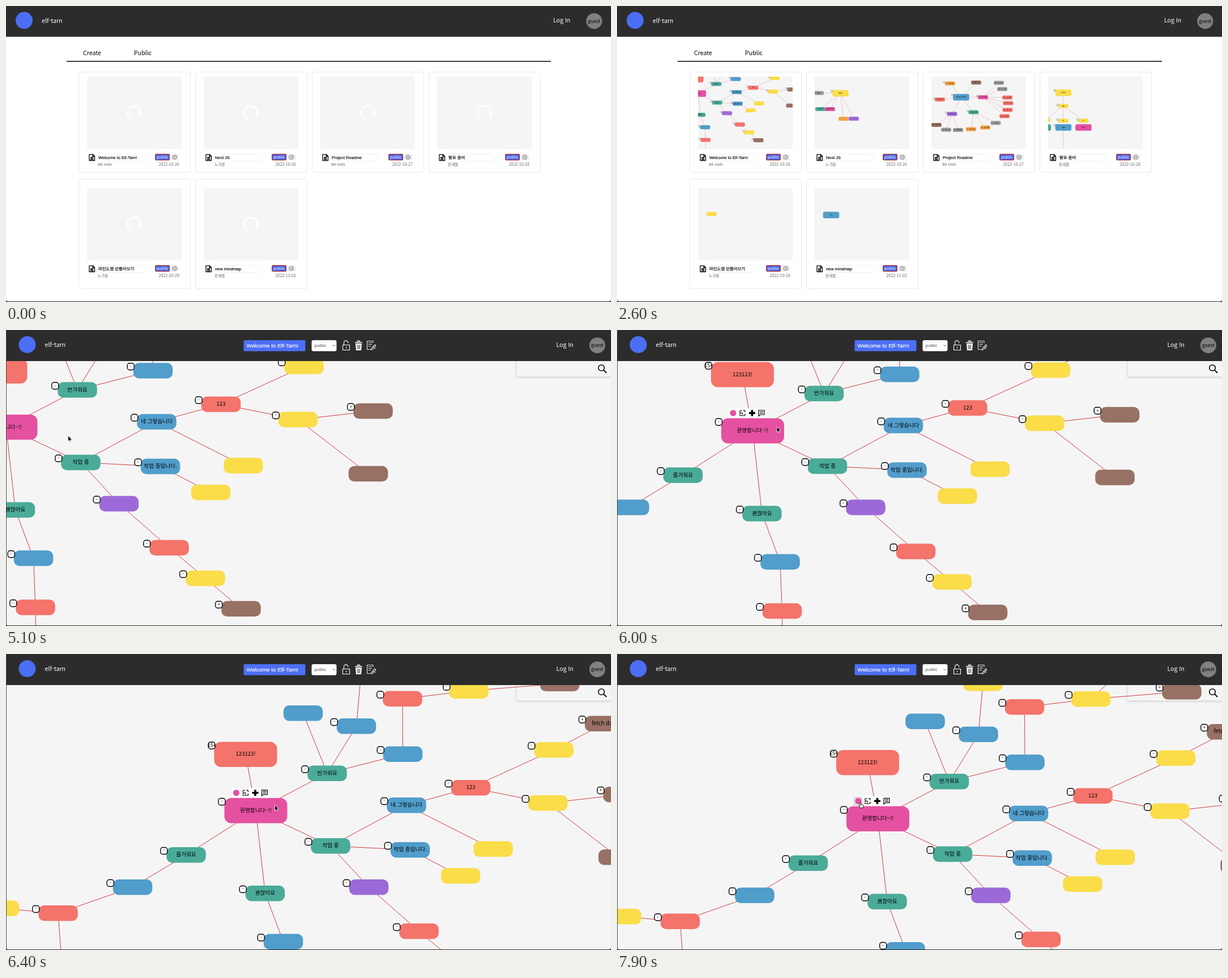
An HTML page that plays this animation: 1068 px wide and 524 px high, repeating every 8000 ms.

```html
<!DOCTYPE html>
<html lang="ko">
<meta charset="utf-8">
<title>elf-tarn</title>
<style>
  html, body { margin: 0; width: 100%; height: 100%; overflow: hidden; background: #fff; }
  svg { display: block; }
  text { font-family: 'Noto Sans CJK KR', 'Noto Sans CJK JP', 'Noto Sans CJK', 'Noto Sans', sans-serif; white-space: pre; }
  .ui { font-family: 'Liberation Sans', Arial, sans-serif; }
  .med { font-weight: 500; }
</style>
<body>
<script>
const COLORS = { r: '#f4736b', b: '#519dcb', y: '#fadd49', g: '#4aab98', p: '#e551a1', u: '#9c6ad8', n: '#977164', o: '#f5a142', e: '#999' };
const SCALE = 0.257;

// Rows: colour (capital = large node), x, y, parent index, label, toggle mark
const MAP = [
  ['P', 0, 0, -1, '환영합니다~!!'],
  ['R', -18, -99.5, 0, '123123!', '15+'],
  ['g', 126, -66, 0, '반가워요'],
  ['g', 132, 62.5, 0, '작업 중'],
  ['g', 16.5, 146.5, 0, '괜찮아요'],
  ['g', -123, 78.5, 0, '즐거워요'],
  ['b', 83.5, -172.5, 2],
  ['b', 177.5, -149.5, 2],
  ['b', 259.5, -100, 2],
  ['y', 185.5, -240, 7],
  ['r', 259, -198, 8],
  ['y', 376, -212, 10],
  ['n', 536.5, -225, 11, '', '+'],
  ['y', 456, -286, 11],
  ['b', 266, -9.5, 3, '네 그렇습니다'],
  ['b', 272.5, 69.5, 3, '작업 중입니다.'],
  ['u', 199.5, 135.5, 3],
  ['r', 379.5, -40.5, 14, '123'],
  ['y', 419, 68, 14],
  ['y', 526, -107.5, 17],
  ['y', 515.5, -13.5, 17],
  ['n', 615.5, -154, 19, 'fetch data', '+'],
  ['n', 648, -28.5, 20, '', '+'],
  ['n', 639.5, 82.5, 20],
  ['y', 361.5, 115.5, 15],
  ['r', 288, 213.5, 16],
  ['y', 352, 267.5, 25],
  ['n', 415, 321.5, 26, '', '+'],
  ['b', 48.5, 232, 4],
  ['r', 52, 319, 28],
  ['y', 53, 420, 29],
  ['b', -217.5, 135.5, 5],
  ['r', -349, 181.5, 31],
  ['y', -343, 263.5, 32],
  ['y', -452.5, 173, 32]
];
const NEXT = [
  ['Y', 45.5, 29.5, -1, 'Nextjs'], ['e', 7, 29, 0, 'Why?'], ['g', 10, 57.5, 0, '시작하기'],
  ['p', 27, 57.5, 0, 'Data Fetch'], ['o', 51, 74.5, 0], ['u', 69, 74.5, 0]
];
const README = [
  ['B', 52.5, 36.5, -1, 'elf-tarn 프로젝트'],
  ['o', 33, 12, 0, '1. 기획 배경', '-'], ['n', 79, 10.5, 0, '2. 개발 기간'], ['p', 91, 36.5, 0, '3. 기능 소개'],
  ['r', 15, 40.5, 0, '6. 팀원 소개', '-'], ['u', 36.5, 66, 0, '5. 기술 스택'], ['g', 74.5, 63, 0, '4. 실행 방법'],
  ['e', 119, 11, 3, '3-1. 노드 추가'], ['e', 125, 22, 3, '3-2. 노드 이동'], ['r', 134, 37, 3, '3-3. 노드 색상'],
  ['r', 135.5, 47, 3, '3-4. 노드 크기'], ['r', 134.5, 59, 3, '3-5. 댓글 기능'], ['r', 129, 70, 3, '3-6. 노드 검색'],
  ['n', 9, 85.5, 5, '5-1. 화면 구성'], ['e', 26, 94, 5, '5-2. 서버 구성'], ['e', 47, 94.5, 5, '5-3. Database'],
  ['o', 70, 93, 6, '4-1. 환경 설정'], ['o', 95, 90, 6, '4-2. 설치 방법'], ['e', 113.5, 82, 6, '4-3. 실행']
];
const TALK = [
  ['Y', 27, 28.5, -1, 'elf-tarn'], ['y', 27, 52, 0, '발표'], ['y', 27, 78, 1, '앞'], ['y', 62, 78, 1, '뒤'],
  ['B', 27, 90, 2, '김발표'], ['P', 62.5, 90, 3, '시연자'], ['y', -5, 76.5, 1], ['G', -9, 90, 6], ['y', 27, 140, 4]
];
const CARDS = [
  ['Welcome to Elf-Tarn!', 'BK HAN', '2022-10-26'],
  ['Next JS', '노가람', '2022-10-26', NEXT],
  ['Project Readme', 'BK HAN', '2022-10-27', README],
  ['발표 준비', '문새봄', '2022-10-28', TALK],
  ['마인드맵 만들어보기', '노가람', '2022-10-29', [['y', 24, 45.5, -1]]],
  ['new mindmap', '문새봄', '2022-11-02', [['B', 29, 47.5, -1, '시작']]]
];

const rect = (x, y, w, h, fill, r = 0, more = '') =>
  `<rect x="${x}" y="${y}" width="${w}" height="${h}" fill="${fill}" rx="${r}" ${more}/>`;
const circle = (x, y, r, fill, more = '') => `<circle cx="${x}" cy="${y}" r="${r}" fill="${fill}" ${more}/>`;
const text = (x, y, s, size, fill = '#000', more = '') =>
  `<text x="${x}" y="${y}" font-size="${size}" fill="${fill}" ${more}>${s}</text>`;
const line = (d, stroke, w, more = '') => `<path d="${d}" fill="none" stroke="${stroke}" stroke-width="${w}" ${more}/>`;
const at = (x, y, s, id = '') => `<g ${id && `id="${id}"`} transform="translate(${x} ${y})">${s}</g>`;
const MID = 'text-anchor="middle"';

function graph(rows, k = 1) {
  let lines = '', nodes = '';
  rows.forEach(([c, px, py, parent, label = '', mark], i) => {
    const x = px / k, y = py / k, big = c < 'a';
    const w = big ? 111 : 69.5, h = big ? 44.5 : 27.5;
    const from = rows[parent];
    if (from) lines += `M${from[1] / k} ${from[2] / k}L${x} ${y}`;
    nodes += rect(x - w / 2, y - h / 2, w, h, COLORS[c.toLowerCase()], big ? 12 : 10);
    if (label) nodes += text(x, y + 2.6, label, 9.6, '#000', MID + ' class="med"');
    if (!mark && rows.some(r => r[3] === i)) mark = '-';
    if (mark) {
      const tx = x - w / 2 - 4.5, ty = y - h / 2 + 6.5;
      nodes += rect(tx - 6, ty - 6, 12, 12, '#fff', 4, 'stroke="#000" stroke-width="1.4"') +
        text(tx, ty + 2.8, mark, 8.5, '#000', MID);
    }
  });
  return line(lines, '#cf3a40', 1) + nodes;
}

const docIcon = line('M1 .8H7.5L10.5 4V11.5H1ZM7.2 1V4.3H10.3M3 6H8.3M3 7.8H8.3M3 9.6H8.3', '#000', 1.3, 'stroke-linejoin="round"');

function card([title, author, date, rows], i) {
  const x = 128.5 + 206 * (i % 4), low = i > 3, ty = low ? 322.5 : 125, dy = low ? 197 : 0;
  const inner = rows ? graph(rows, SCALE) : graph(MAP);
  const origin = rows ? '0 0' : '0 30';
  return rect(x, low ? 306.5 : 117, 197, low ? 194 : 177.5, '#fff', 3, 'stroke="#e8e8e8"') +
    rect(x + 14.5, ty, 167, 128, '#f5f5f5') +
    `<svg class="thumb" x="${x + 14.5}" y="${ty}" width="167" height="128"><g transform="translate(${origin}) scale(${SCALE})">${inner}</g></svg>` +
    `<g class="spin">${line(`M${x + 93} ${ty + 75.3}A12 12 0 1 1 ${x + 108} ${ty + 70}`, '#fff', 2.6)}</g>` +
    at(x - 128.5, dy,
      at(146, 262, docIcon) +
      rect(160.5, 262, 84.5, 12.5, '#fff', 5, 'stroke="#eee" stroke-width=".8"') +
      text(163, 270.8, title, 7.4, '#000', 'class="ui" stroke="#000" stroke-width=".15"') +
      rect(263.8, 262.5, 24.6, 10.2, '#4a68ee', 1.5, 'stroke="#a02833" stroke-width="1.3"') +
      text(276.2, 269.9, 'public', 7, '#fff', MID) +
      rect(291, 262.5, 14.5, 10.5, '#efefef', 2) +
      circle(297.6, 267.6, 3.6, 'none', 'stroke="#777" stroke-width="1.4" stroke-dasharray="1.6 .7"') +
      circle(297.6, 267.6, 1.5, 'none', 'stroke="#777" stroke-width=".7"') +
      text(162, 282.8, author, 6.7, '#666') +
      text(306, 282.5, date, 7.1, '#666', 'text-anchor="end"'));
}

const header = (dx, dy) => rect(0, 0, 1068, 54.5 + dy, '#2c2c2c') +
  at(dx, dy,
    circle(32, 25.5, 15, '#4c6ef5') +
    text(63, 29.5, 'elf-tarn', 10.7, '#fff', 'class="med"') +
    text(966, 29.3, 'Log In', 10.5, '#fff', 'class="med"') +
    circle(1038.3, 26.7, 14, '#808080') +
    text(1038.3, 29.6, 'guest', 8.6, '#000', MID));

const listPage = rect(0, 0, 1068, 524, '#fff') + header(0, 0) +
  text(136, 87, 'Create', 10.6) + text(226, 87, 'Public', 10.6) +
  rect(107, 97.2, 855, 1.6, '#111') + CARDS.map(card).join('');

const toolbar = rect(-42.5, -40, 66, 17, '#fff', 3) +
  `<g id="hover">${rect(-43, -39, 16, 16, '#dcdcdc', 2)}</g>` +
  circle(-34.5, -31.5, 5.6, COLORS.p) +
  line('M-22.5 -33V-36H-19.5M-16.5 -36H-13.5V-33M-13.5 -30V-27H-16.5M-22.5 -31.5H-18.2V-27H-22.5Z', '#000', 1.4, 'stroke-dasharray="3 1"') +
  line('M-1 -37V-26M-6.5 -31.5H4.5', '#000', 3.6) +
  line('M10.5 -36.5H20.5V-28.5H13L10.5 -26ZM12.5 -34H18.5M12.5 -31.2H18.5', '#000', 1.2);

const icons =
  line('M594.5 26.5H606.5V35.5H594.5ZM596.5 26V22.5A3.6 3.6 0 0 1 603.7 22.5V23.5M600.5 29.5V32.5', '#fff', 1.1) +
  line('M616 22.3H629M620.5 21V19.5H624.5V21', '#fff', 1.5) +
  `<path d="M617 24H628L627 36H618Z" fill="#fff"/>` +
  line('M620.2 26L620.6 34M622.5 26V34M624.8 26L624.4 34', '#2c2c2c', .9) +
  line('M648 23V19.5H637.5V34.5H644M639.5 22.5H646M639.5 25.5H646M639.5 28.5H644M645 33L651 26L653 28L647 34.5L644.5 35ZM648 30L652 33', '#ddd', 1.2);

const mapPage = rect(0, 0, 1068, 524, '#fff') +
  `<g id="ground">${rect(0, 54, 1068, 470, '#f5f5f5')}</g>` +
  `<g id="search">${rect(901.5, 40, 180, 42.5, '#fff', 0, 'style="filter:drop-shadow(0 1px 2px #0003)"')}</g>` +
  at(0, 0, graph(MAP) + `<g id="tools">${toolbar}</g>`, 'map') +
  circle(1051, 67, 5.3, 'none', 'stroke="#000" stroke-width="1.6"') +
  line('M1055 71L1060 76', '#000', 1.8) +
  header(5.5, .5) +
  rect(419.5, 18, 109, 19.5, '#4c6ff5', 2) +
  text(424.5, 30.8, 'Welcome to Elf-Tarn!', 9.9, '#fff', 'class="ui" stroke="#fff" stroke-width=".2"') +
  rect(539.5, 18, 44, 19.5, '#fff', 3) +
  text(544.5, 30.2, 'public', 8, '#555', 'class="ui"') +
  line('M576.5 26.5L578.5 28.7L580.5 26.5', '#555', 1) + icons +
  rect(0, 0, 1, 524, '#444') +
  `<g id="status">${rect(-3, 513, 358.5, 14, '#dfe1e8', 2, 'stroke="#b4b6bc"')}${text(3, 520.8, 'localhost의 응답을 기다리는 중...', 6.4, '#333')}</g>`;

const arrow = `<path d="M0 0V10L2.4 7.9L3.9 11.1L5.4 10.4L4 7.3H7Z" fill="#000" stroke="#fff" stroke-width=".8"/>`;
const hand = `<path d="M-1 .5Q0 -.6 1 .5V3.6L4.6 4.6Q5.4 5 5.2 6.2L4.4 9.5H-.6L-3 6Q-3 4.8 -1 5.8Z" fill="#fff" stroke="#000" stroke-width=".9"/>`;

document.body.innerHTML = `<svg width="1068" height="524" viewBox="0 0 1068 524">
  <g id="list">${listPage}</g><g id="detail">${mapPage}</g>
  <path d="M0 519Q0 523 4 523H1064Q1068 523 1068 519V524H0Z" fill="#2a2a2a"/>
  ${at(0, 0, `<g id="arrow">${arrow}</g><g id="hand">${hand}</g>`, 'cursor')}</svg>`;

// Keys: time, x, y
const PAN = [
  [5400, 0, 172], [5600, 35, 172], [5800, 120, 173], [6000, 239.5, 178.5], [6100, 313, 207],
  [6200, 371.5, 239.8], [6400, 441, 277.3], [6600, 456, 288], [6900, 460.5, 291.8]
];
const POINTER = [
  [2800, 809, 468], [3600, 241, 231], [4700, 241, 231], [5300, 44, 165], [5400, 44, 165], [5600, 79, 165],
  [5800, 163, 166], [6000, 282, 171], [6100, 351, 200], [6200, 408.5, 232], [6400, 474.5, 267.5],
  [6600, 489, 278], [6900, 493, 281], [7100, 493, 281], [7700, 434, 266], [7900, 430, 263]
];

function follow(keys, t) {
  const i = keys.findIndex(k => k[0] > t);
  if (i < 0) return keys.at(-1).slice(1);
  if (!i) return keys[0].slice(1);
  const [a, b] = [keys[i - 1], keys[i]], u = (t - a[0]) / (b[0] - a[0]);
  return [1, 2].map(n => a[n] + (b[n] - a[n]) * u);
}
const show = (sel, on) => document.querySelectorAll(sel).forEach(e => e.style.display = on ? '' : 'none');
const move = (id, p) => document.getElementById(id).setAttribute('transform', `translate(${p})`);

function draw(now) {
  const t = Math.floor(now % 8000 / 100) * 100;
  const loaded = t >= 4800, pointing = t >= 7700;
  show('.spin', t < 100);
  show('.thumb', t >= 100);
  show('#list', t < 4400);
  show('#detail', t >= 4400);
  show('#ground, #map', loaded);
  show('#status', !loaded);
  document.querySelector('#search rect').setAttribute('fill', loaded ? '#f5f5f5' : '#fff');
  show('#tools', t >= 5300);
  show('#hover, #hand', pointing);
  show('#arrow', !pointing);
  show('#cursor', t >= 2800);
  move('map', follow(PAN, t));
  move('cursor', follow(POINTER, t));
}
const start = performance.now();
(function tick() {
  draw(performance.now() - start);
  requestAnimationFrame(tick);
})();
</script>
</body>
</html>
```
